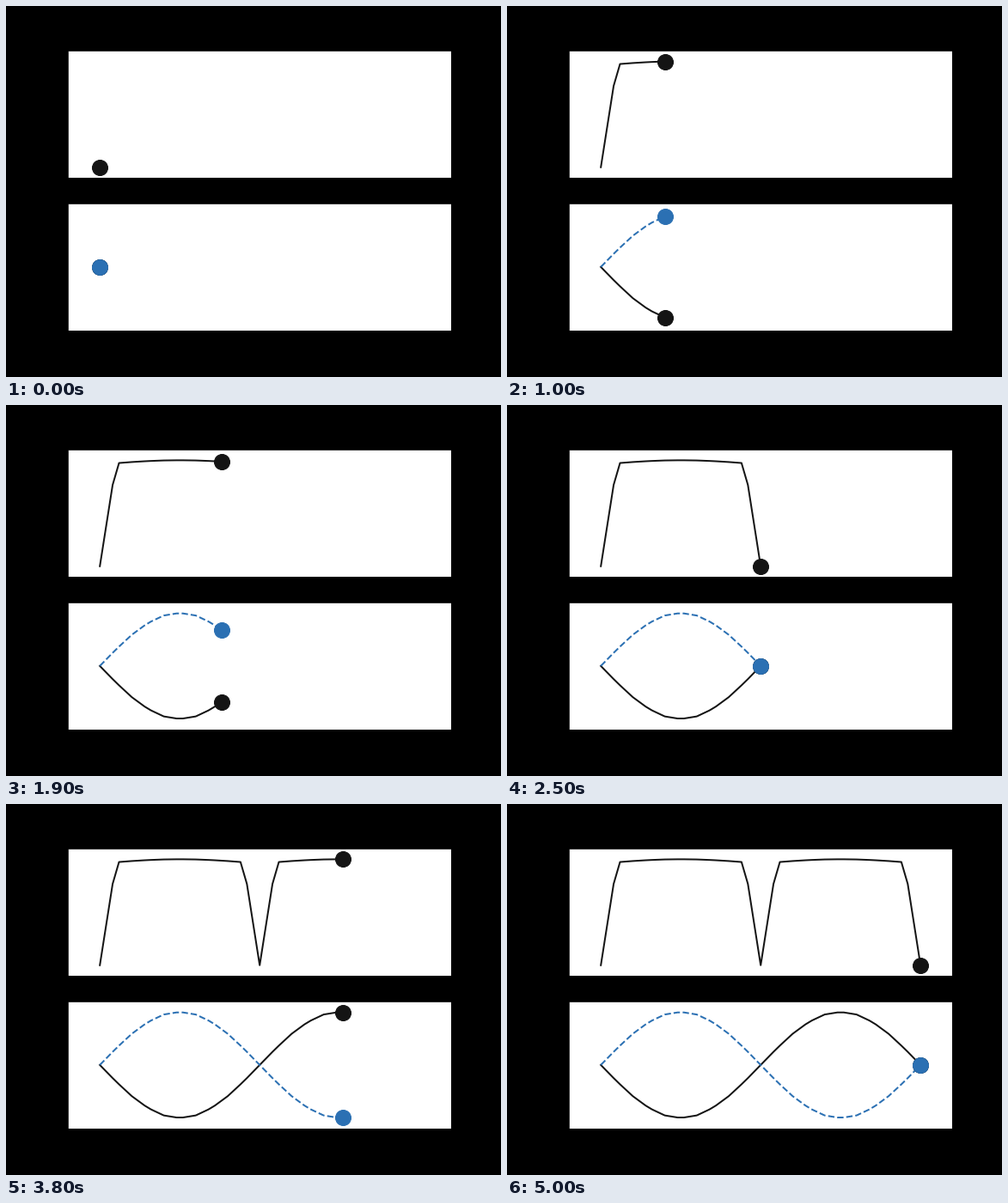
A matplotlib script that plays this animation: 576x432 px, repeating every 5100 ms.

```python
import numpy as np
import matplotlib.pyplot as plt
from matplotlib.animation import FuncAnimation

INK = "#141414"
BLUE = "#2b70b3"
STEPS = 51

# A coarse sine wave, resampled at every animation step
knots = np.linspace(0, 10, 21)
t = np.linspace(0, 10, STEPS)
wave = np.interp(t, knots, np.sin(2 * np.pi * knots / 10))

# The upper curve rises steeply, then saturates
size = np.abs(wave)
response = np.minimum(3.1 * size, 0.958 + 0.041 * size)

fig, (top, bottom) = plt.subplots(2, 1, figsize=(8, 6), dpi=72, facecolor="black")
fig.subplots_adjust(left=0.125, right=0.9, bottom=0.125, top=0.88, hspace=0.2)

for ax, limits in ((top, (-0.1, 1.1)), (bottom, (-1.2, 1.2))):
    ax.set(xlim=(-1, 11), ylim=limits, xticks=[], yticks=[], facecolor="white")
    for spine in ax.spines.values():
        spine.set(color="black", linewidth=0.8)


def make_track(ax, values, color, style="-"):
    line, = ax.plot([], [], style, color=color, lw=2, zorder=2)
    dot, = ax.plot([], [], "o", color=color, ms=18, mew=1, zorder=3)
    return line, dot, values


tracks = [
    make_track(top, response, INK),
    make_track(bottom, -wave, INK),
    make_track(bottom, wave, BLUE, "--"),
]


def draw(i):
    for line, dot, values in tracks:
        line.set_data(t[:i + 1], values[:i + 1])
        dot.set_data([t[i]], [values[i]])
    return [artist for track in tracks for artist in track[:2]]


anim = FuncAnimation(fig, draw, frames=STEPS, interval=100, repeat=True, repeat_delay=0)
plt.show()
```
